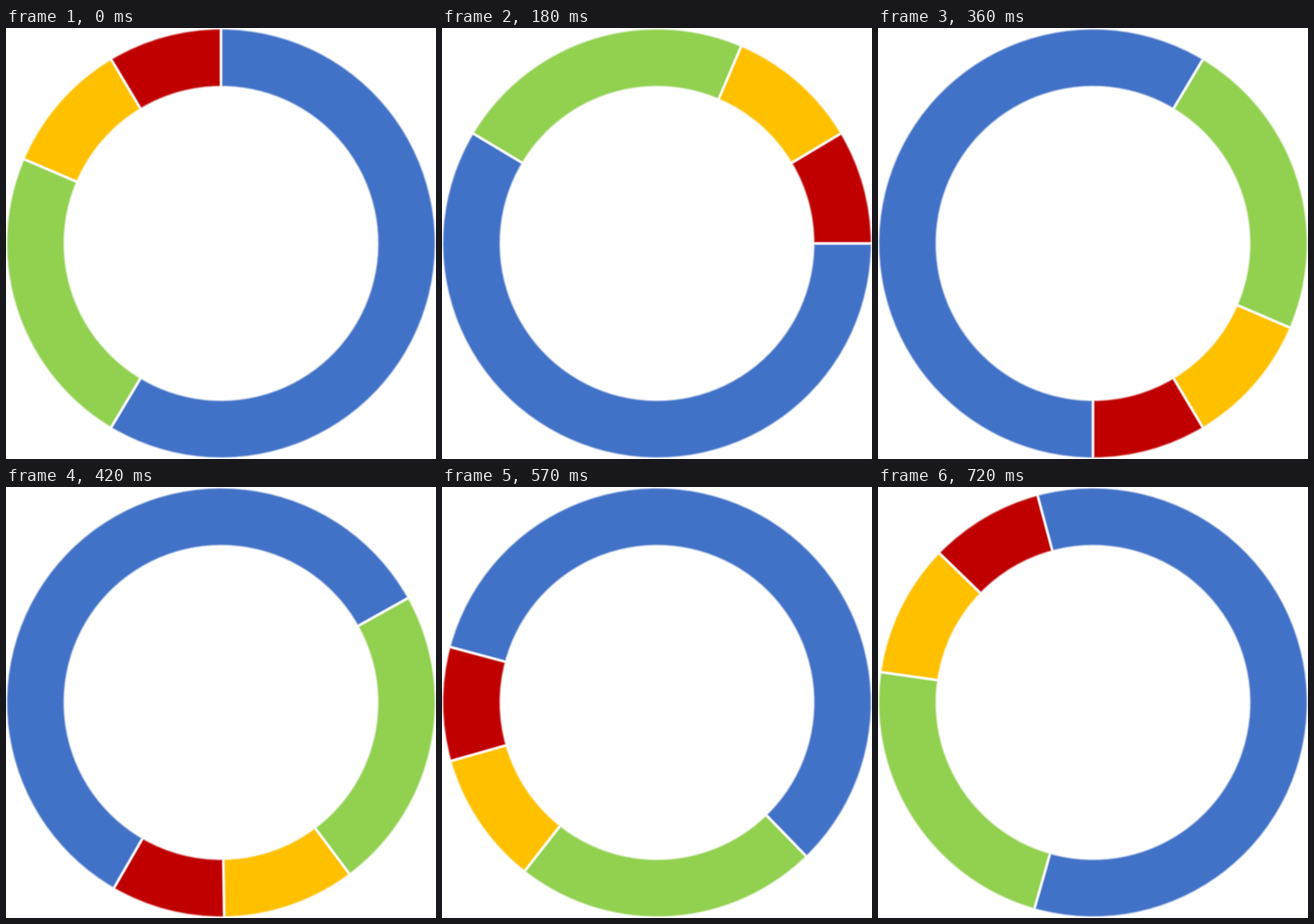
Animation of 640x641 px, one loop 750 ms. Source, as a matplotlib script:

```python
import matplotlib.pyplot as plt
import numpy as np
from matplotlib.animation import FuncAnimation
from matplotlib.patches import Wedge

W, H, DPI = 640, 641, 64
FRAMES, INTERVAL = 25, 30
STEP = 15          # degrees clockwise per move
HOLD = 20          # the ring rests for one tick here
CENTER = (320, 320.4)
OUTER, INNER = 319.6, 232.8

VALUES = [8.2, 3.2, 1.4, 1.2]
COLORS = ["#4272c7", "#92d050", "#ffc000", "#c00000"]
# Stacked white strokes (width in px, opacity) give the soft borders.
STROKES = [(5.4, 0.22), (3.6, 0.35), (2.0, 0.6)]

bounds = np.concatenate([[0], np.cumsum(VALUES)]) / sum(VALUES) * 360 - 90

fig = plt.figure(figsize=(W / DPI, H / DPI), dpi=DPI, facecolor="white")
ax = fig.add_axes([0, 0, 1, 1])
ax.set_xlim(0, W)
ax.set_ylim(H, 0)
ax.axis("off")


def add_slice(i, **style):
    wedge = Wedge(CENTER, OUTER, bounds[i], bounds[i + 1],
                  width=OUTER - INNER, **style)
    ax.add_patch(wedge)
    return i, wedge


slices = [add_slice(i, facecolor=c, edgecolor="none", zorder=1)
          for i, c in enumerate(COLORS)]
for width, alpha in STROKES:
    slices += [add_slice(i, facecolor="none", edgecolor=(1, 1, 1, alpha),
                         linewidth=width * 72 / DPI, zorder=2)
               for i in range(len(COLORS))]


def update(frame):
    turn = STEP * (frame if frame < HOLD else frame - 1)
    for i, wedge in slices:
        wedge.set_theta1(bounds[i] + turn)
        wedge.set_theta2(bounds[i + 1] + turn)
    return [wedge for _, wedge in slices]


anim = FuncAnimation(fig, update, frames=FRAMES, interval=INTERVAL,
                     repeat=True, repeat_delay=0, blit=False)
plt.show()
```
